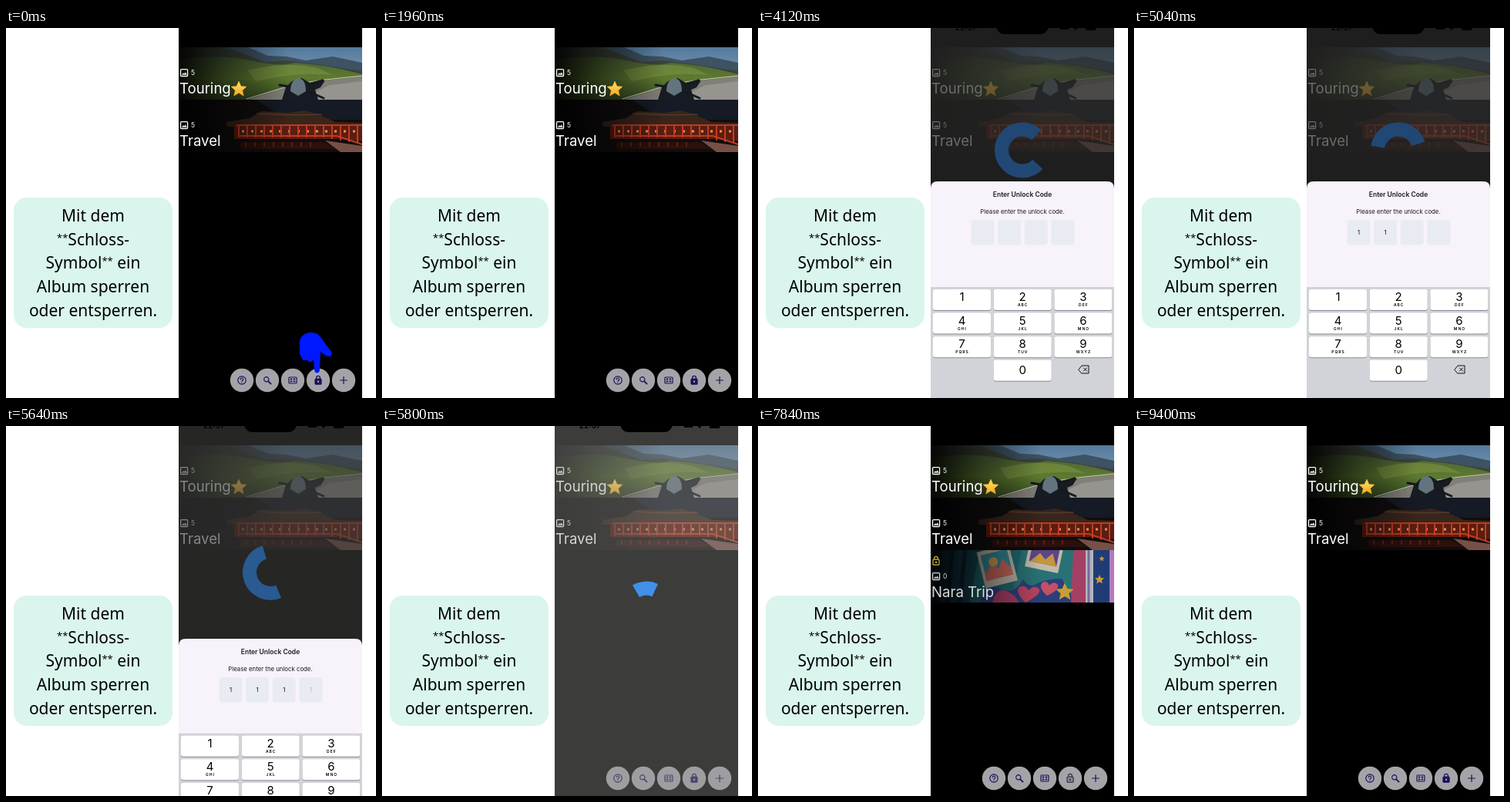
These frames come from a looping animation (480x480 px, 9.88 s). An HTML page:

```html
<!DOCTYPE html>
<html lang="de">
<head>
<meta charset="utf-8">
<title>Album sperren</title>
<style>
html, body { margin: 0; width: 100%; height: 100%; overflow: hidden; background: #fff; }
svg { display: block; width: 100vw; height: 100vh; }
.ui { font-family: Inter, "Noto Sans", sans-serif; }
.note { font: 21px "Noto Sans", "Open Sans", sans-serif; text-anchor: middle; }
.mid { text-anchor: middle; }
.line { fill: none; stroke-linecap: round; stroke-linejoin: round; }
</style>
</head>
<body>
<svg viewBox="0 0 480 480">
  <defs>
    <clipPath id="screen"><path d="M224 0H462V480H224Z"/></clipPath>
    <clipPath id="row"><path d="M0 0H238V68H0Z"/></clipPath>
    <linearGradient id="shade">
      <stop offset="0" stop-opacity=".92"/><stop offset=".25" stop-opacity=".5"/><stop offset=".6" stop-opacity="0"/>
    </linearGradient>
    <linearGradient id="sky" x2="0" y2="1"><stop stop-color="#54799b"/><stop offset="1" stop-color="#93b3ca"/></linearGradient>
    <linearGradient id="hill" x2="0" y2="1"><stop stop-color="#4a6136"/><stop offset=".5" stop-color="#5d7a30"/><stop offset="1" stop-color="#354a22"/></linearGradient>
    <linearGradient id="gold" x2="0" y2="1"><stop stop-color="#ffe46a"/><stop offset="1" stop-color="#f5a623"/></linearGradient>
    <path id="star" d="M0-10L3-3.4 10-2.9 4.7 1.9 6.3 9 0 5.2-6.3 9-4.7 1.9-10-2.9-3-3.4Z" stroke-linejoin="round"/>
    <g id="picture" class="line" stroke="#fff" stroke-width="1.2">
      <rect x=".6" y=".6" width="9" height="9" rx="1"/><path d="M2.3 7.6L4 5.5 5.2 6.8 6.7 4.8 8.4 7.6Z" fill="#fff" stroke-width=".5"/>
    </g>
    <g id="padlock"><rect x="-4" y="-1.8" width="8" height="7" rx="1"/></g>
  </defs>

  <rect x="10" y="220" width="206" height="169" rx="17" fill="#daf5ed"/>
  <g class="note">
    <text x="113" y="251">Mit dem</text>
    <text x="113" y="281.5"><tspan font-size="13" dy="-5">**</tspan><tspan dy="5">Schloss-</tspan></text>
    <text x="113" y="312">Symbol<tspan font-size="13" dy="-5">**</tspan><tspan dy="5"> ein</tspan></text>
    <text x="113" y="343">Album sperren</text>
    <text x="113" y="374">oder entsperren.</text>
  </g>

  <g clip-path="url(#screen)" class="ui">
    <rect x="224" width="238" height="480"/>

    <g transform="translate(224 25)" clip-path="url(#row)">
      <rect width="238" height="68" fill="url(#sky)"/>
      <path d="M0 0H90L116 11 140 12 165 17 200 12 238 20V68H0Z" fill="#3d5263"/>
      <path d="M0 0H62L84 8 112 19 140 17 180 22 238 31V68H0Z" fill="#3b4438"/>
      <path d="M0 16Q50 8 92 17T150 20Q190 22 238 35V68H0Z" fill="url(#hill)"/>
      <path d="M90 30Q140 17 180 27L200 36Q150 32 100 44Z" fill="#789140" opacity=".65"/>
      <path d="M238 38L190 43 140 51 90 68H238Z" fill="#817f77"/>
      <path d="M238 44L196 49 158 68H238Z" fill="#96948e"/>
      <path d="M238 37L190 42 150 48 88 67" class="line" stroke="#c9c8bb" stroke-width="1.2"/>
      <path d="M134 68L139 52 147 44 160 40 173 48 190 43 184 52 177 55 181 68Z" fill="#171c22"/>
      <path d="M145 57Q145 42 156 40 165 42 165 57L155 63Z" fill="#64747f"/>
      <path d="M131 49L143 51M169 48L187 43M172 59L188 66" class="line" stroke="#15191d" stroke-width="3"/>
      <rect width="238" height="68" fill="url(#shade)"/>
    </g>

    <g transform="translate(224 93)" clip-path="url(#row)">
      <rect width="238" height="68" fill="#100d0d"/>
      <path d="M100 0H238V26H140Z" fill="#151a24"/>
      <path d="M62 29L92 24 108 15 142 17 163 14 184 20 204 29 238 30V35H62Z" fill="#38251c"/>
      <path d="M102 18Q145 21 185 19" class="line" stroke="#543a2b" stroke-width="1.5"/>
      <path d="M72 32H238V54L208 51 72 51Z" fill="#5c1d12"/>
      <path d="M76 33H238M80 47H205L238 58" class="line" stroke="#ba3c20" stroke-width="2.2"/>
      <path d="M82 41H232" stroke="#e39150" stroke-width="3" stroke-dasharray="3 9"/>
      <path id="pillars" class="line" stroke="#c53a1e" stroke-width="2"/>
      <path d="M80 55H188L204 64H80Z" fill="#2b100c"/>
      <path d="M190 53L238 60V68H210Z" fill="#765046"/>
      <path d="M86 58H182" stroke="#7c2b18" stroke-width="6" stroke-dasharray="2 10" opacity=".6"/>
      <rect width="238" height="68" fill="url(#shade)"/>
    </g>

    <g id="trip">
      <g transform="translate(224 161)" clip-path="url(#row)">
        <rect width="238" height="68" fill="#287980"/>
        <path d="M0 0H64L50 68H0Z" fill="#195564"/>
        <path d="M12 0L7 68M28 0L22 68M45 0L37 68" stroke="#103445" stroke-width="6"/>
        <path d="M118 0H184L207 68H104Z" fill="#32888c"/>
        <path d="M64 68Q73 40 90 50T120 38Q128 50 137 44T170 37L188 68Z" fill="#364c91"/>
        <g transform="rotate(-14 87 22)">
          <rect x="65" y="-3" width="43" height="48" fill="#d8cdbd"/><rect x="69" y="2" width="35" height="34" fill="#3b9caf"/>
          <path d="M69 36V27L80 17 88 24 95 13 104 27V36Z" fill="#e87568"/><circle cx="83" cy="14" r="6" fill="#efb35c"/>
        </g>
        <g transform="rotate(12 148 5)">
          <rect x="126" y="-18" width="44" height="44" fill="#eadfcb"/><rect x="130" y="-14" width="36" height="32" fill="#7053a5"/>
          <path d="M131 18L142 5 150 12 158 2 166 18Z" fill="#e9b549"/>
        </g>
        <path d="M123 68Q109 55 115 48 122 44 127 52 135 44 141 51 143 58 123 68Z" fill="#de5174"/>
        <path d="M151 59Q139 49 145 42 151 39 154 46 160 39 165 45 167 52 151 59Z" fill="#ea6079"/>
        <path d="M80 68Q85 48 98 53T114 68Z" fill="#c64a78"/>
        <path d="M185 0H201L207 68H182Z" fill="#c34d78"/>
        <path d="M201 0H211V68H201Z" fill="#d7d7e1"/><path d="M205 0V68" stroke="#8d80bd" stroke-width="3"/>
        <path d="M211 0H233V68H211Z" fill="#28488d"/><path d="M232 0H238V68H232Z" fill="#d794e5"/>
        <use href="#star" fill="#f3bd3d" transform="translate(174 54) scale(1.15)"/>
        <use href="#star" fill="#f3bd3d" transform="translate(219 38) scale(.6)"/>
        <use href="#star" fill="#e8b75c" transform="translate(222 11) scale(.35)"/>
        <rect width="238" height="68" fill="url(#shade)"/>
      </g>
      <g transform="translate(231 175)" fill="none" stroke="#f7d834" stroke-width="1.2">
        <use href="#padlock"/><path d="M-2.4-2V-3.3A2.4 2.4 0 0 1 2.4-3.3V-2"/><circle cy="1.7" r=".7"/>
      </g>
    </g>
    <g id="labels" fill="#fff"></g>
    <use href="#star" fill="url(#gold)" stroke="#f3a821" stroke-width=".5" transform="translate(302 79)"/>
    <g id="buttons"></g>
    <path id="hand" fill="#0018ff" d="M381 413C379 402 386 395 396 395 403 395 408 399 411 405L422 420C425 425 420 428 415 425L408 420 407 443C407 449 400 449 400 443L399 430C396 435 392 434 391 430 387 433 383 430 383 426 380 424 381 419 381 413Z"/>

    <g id="loader">
      <rect x="224" width="238" height="480" fill="#bebeb9" opacity=".35"/>
      <path id="spinner" fill="none" stroke="#489dff" stroke-width="18"/>
    </g>
    <rect id="barrier" x="224" width="238" height="480"/>
    <g id="status">
      <rect x="309" y="-14" width="68" height="22" rx="11"/>
      <text x="256" y="3" font-size="10" font-weight="600">22:37</text>
      <path d="M392-4H403V2H392ZM406-4H418L412 3ZM425-4H438V3H425Z"/>
    </g>

    <g id="sheet">
      <path d="M224 300V9Q224 0 233 0H453Q462 0 462 9V300Z" fill="#f8f2fa"/>
      <text class="mid" x="343" y="20" font-size="8.5" font-weight="600" fill="#1d1b20">Enter Unlock Code</text>
      <text class="mid" x="343" y="42" font-size="7.8" fill="#1d1b20">Please enter the unlock code.</text>
      <g id="code"></g>
    </g>
    <g id="keyboard">
      <rect x="224" width="238" height="200" fill="#d1d3d9"/>
      <g id="keys"></g>
      <path d="M416 107L420 102H429V112H420ZM422.5 105L426.5 109M426.5 105L422.5 109" class="line" stroke="#111"/>
    </g>
  </g>
</svg>
<script>
const LOOP = 9880, STEP = 40;
const TAPS = [4640, 4920, 5200, 5560];
const $ = id => document.getElementById(id);
const clamp = x => Math.min(1, Math.max(0, x));
const part = (t, from, to) => clamp((t - from) / (to - from));
const smooth = x => x * x * (3 - 2 * x);
const shift = (id, y) => $(id).setAttribute('transform', `translate(0 ${y})`);
const fade = (id, alpha) => $(id).setAttribute('opacity', alpha);

// Cubic easing with control points (.4, 0) and (.2, 1)
function fastOutSlowIn(x) {
  let low = 0, high = 1;
  for (let i = 0; i < 16; i++) {
    const s = (low + high) / 2;
    const at = 1.2 * s * (1 - s) ** 2 + .6 * s * s * (1 - s) + s ** 3;
    if (at < x) low = s; else high = s;
  }
  return smooth(low);
}

function build() {
  $('pillars').setAttribute('d', Array.from({ length: 15 }, (_, i) =>
    `M${78 + i * 11} 33V${48 + Math.max(0, i - 10) * 2}`).join(''));

  const label = (id, name, count, y) =>
    `<g id="${id}"><use href="#picture" x="226" y="${y - 32}"/>
     <text x="240" y="${y - 24}" font-size="8.5">${count}</text>
     <text x="225" y="${y}" font-size="18.6">${name}</text></g>`;
  $('labels').innerHTML = label('touring', 'Touring', 5, 85) +
    label('travel', 'Travel', 5, 153) + label('tripLabel', 'Nara Trip', 0, 222);

  const icons = [
    '<circle r="5.2"/><path d="M-1.7-1.2A1.7 1.7 0 1 1 .8.2Q0 .7 0 1.4M0 3V3.1"/>',
    '<circle cx="-1.2" cy="-1.2" r="3.1"/><path d="M1.3 1.3L4.6 4.6" stroke-width="1.8"/>',
    '<rect x="-5" y="-4" width="10" height="8" rx="1"/><path d="M-2.3-1.4H-1.6M1.6-1.4H2.3M-2.3 1.5H-1.6M1.6 1.5H2.3" stroke-width="2"/>',
    `<g id="locked"><use href="#padlock" fill="#1c1058"/><path d="M-2.4-2V-3.3A2.4 2.4 0 0 1 2.4-3.3V-2"/><circle cy="1.7" r=".6" stroke="#a4a4a8"/></g>
     <g id="unlocked" stroke="#272330"><use href="#padlock"/><path d="M-2.4-3.3A2.4 2.4 0 0 1 2.4-3.3V-2"/><circle cy="1.7" r=".6"/></g>`,
    '<path d="M-4.5 0H4.5M0-4.5V4.5"/>'
  ];
  $('buttons').innerHTML = icons.map((icon, i) =>
    `<g transform="translate(${306 + i * 33} 457)"><circle r="15.2" fill="#a4a4a8"/>
     <g class="line" stroke="#1c1058" stroke-width="1.2">${icon}</g></g>`).join('');

  $('code').innerHTML = TAPS.map((_, i) => {
    const x = 276.5 + i * 34.6;
    return `<rect x="${x}" y="50" width="30" height="32.5" rx="4" fill="#e9ebf3"/>
      <text class="mid" id="digit${i}" x="${x + 15}" y="69" font-size="7.5">1</text>`;
  }).join('');

  const letters = ['', 'ABC', 'DEF', 'GHI', 'JKL', 'MNO', 'PQRS', 'TUV', 'WXYZ'];
  const key = (digit, text, col, row) => {
    const x = 227 + col * 78.7, y = 3 + row * 30.6;
    return `<rect x="${x}" y="${y + 1}" width="75" height="27" rx="3" fill="#898b90"/>
      <rect id="key${digit}" x="${x}" y="${y}" width="75" height="27" rx="3" fill="#fff"/>
      <text class="mid" x="${x + 37.5}" y="${y + (digit ? 15 : 18)}" font-size="15">${digit}</text>
      <text class="mid" x="${x + 38}" y="${y + 22}" font-size="5" font-weight="600" letter-spacing="1">${text}</text>`;
  };
  $('keys').innerHTML = letters.map((text, i) => key(i + 1, text, i % 3, Math.floor(i / 3))).join('') + key(0, '', 1, 3);
}

function drawSpinner(t, keyboardTop) {
  const age = Math.max(0, t - 3455), phase = age / 1333 % 1;
  const head = fastOutSlowIn(clamp(phase * 2)) * 270;
  const tail = fastOutSlowIn(clamp(phase * 2 - 1)) * 270;
  const start = -128 + tail + phase * 90 + age / 1900 * 360;
  const sweep = Math.max(head - tail, .1);
  const cy = (keyboardTop - 19) / 2;
  const point = deg => {
    const a = deg * Math.PI / 180;
    return `${343 + 27 * Math.cos(a)} ${cy + 27 * Math.sin(a)}`;
  };
  $('spinner').setAttribute('d', `M${point(start)}A27 27 0 ${sweep > 180 ? 1 : 0} 1 ${point(start + sweep)}`);
}

function draw(t) {
  const pulse = 1 + .2 * Math.sin(Math.PI * part(t, 480, 1440)) ** 2;
  $('hand').setAttribute('transform', `translate(401.5 421.5) scale(${pulse}) translate(-401.5 -421.5)`);
  fade('hand', t < 1960 ? 1 : 0);

  const raised = smooth(part(t, 3520, 3920)) - smooth(part(t, 5500, 5830));
  const keyboardTop = 498 - 162 * raised;
  const opened = smooth(part(t, 3440, 3700)) - smooth(part(t, 5590, 5840));
  shift('keyboard', keyboardTop);
  shift('sheet', keyboardTop - 137 * opened);

  const loading = part(t, 3360, 3480) - part(t, 5840, 5960);
  fade('loader', loading);
  fade('status', loading);
  fade('barrier', .54 * (part(t, 3460, 3680) - part(t, 5590, 5840)));
  drawSpinner(t, keyboardTop);

  TAPS.forEach((tap, i) => fade('digit' + i, part(t, tap - 20, tap + (i === 3 ? 400 : 100))));
  const pressed = TAPS.some(tap => t >= tap - 80 && t < tap + 40);
  $('key1').setAttribute('fill', pressed ? '#b3b6be' : '#fff');

  const shown = t < 5960 ? 0 : 1 - part(t, 7760, 8240);
  ['trip', 'tripLabel', 'unlocked'].forEach(id => fade(id, shown));
  fade('locked', 1 - shown);
}

function tick() {
  draw(Math.floor(performance.now() % LOOP / STEP) * STEP);
  requestAnimationFrame(tick);
}

build();
tick();
</script>
</body>
</html>
```
